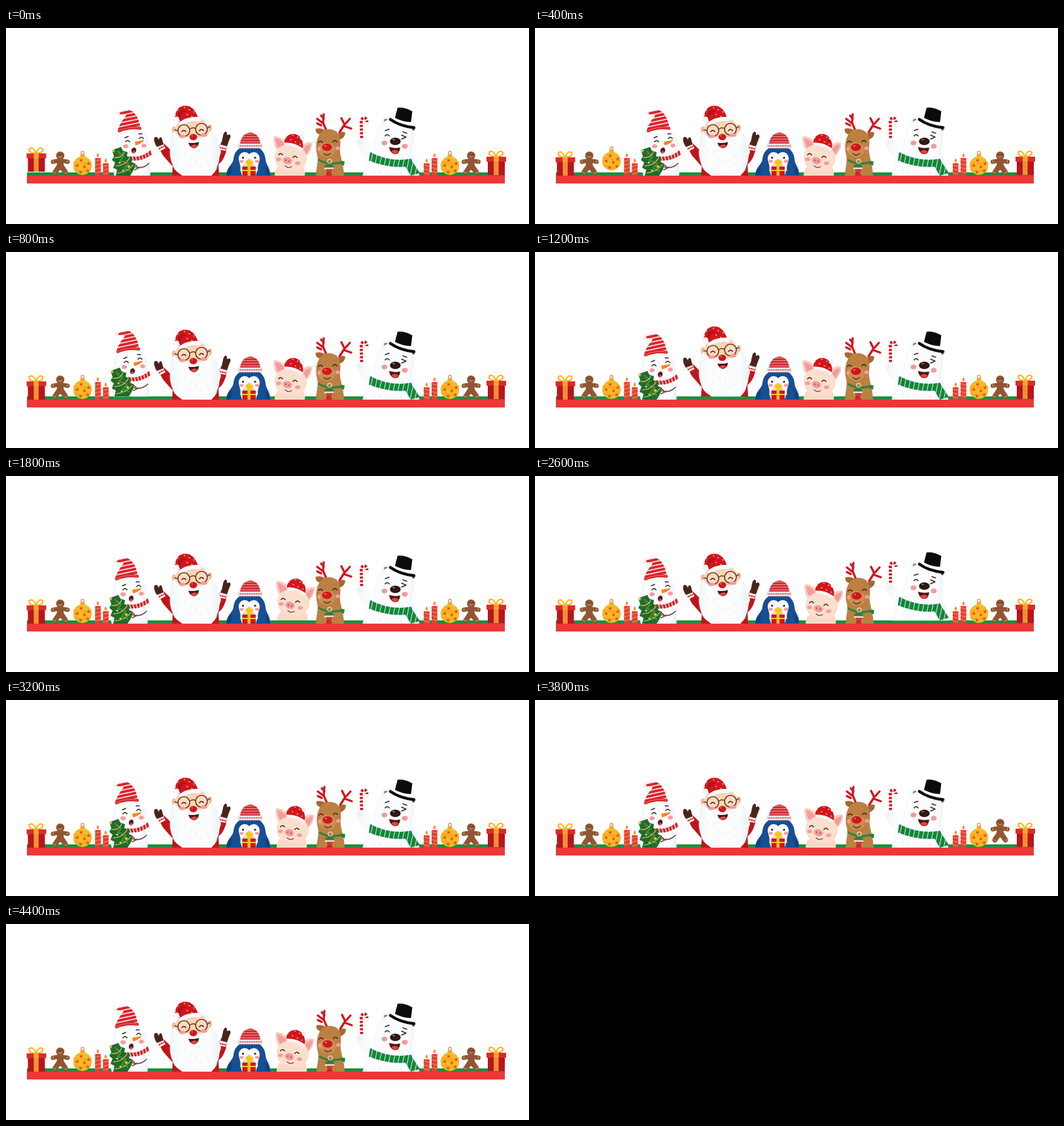
An HTML page that plays this animation: 800 by 300 pixels, repeating every 4600 ms.

```html
<!DOCTYPE html>
<html lang="en">
<head>
<meta charset="utf-8">
<title>Christmas friends</title>
<style>
html, body { margin: 0; width: 100%; height: 100%; overflow: hidden; background: #fff; }
svg { display: block; width: 100vw; height: 100vh; }
.hop { animation: hop 4.6s step-end infinite; animation-delay: calc(var(--at) * 1ms - 4600ms); }
.small { --dy: -7px; }
.big { --dy: -5px; }
@keyframes hop {
  0% { transform: translateY(var(--dy)); }
  4.34%, 100% { transform: none; }
}
/* These three come to rest a little away from where they began. */
.snowman { animation: snowman 4.6s step-end infinite; }
.pig { animation: pig 4.6s step-end infinite; }
.deer { animation: deer 4.6s step-end infinite; }
@keyframes snowman {
  0% { transform: none; }
  17.39% { transform: translate(-2px, -5px); }
  21.73%, 100% { transform: translate(-4px, 0); }
}
@keyframes pig {
  0% { transform: none; }
  39.13% { transform: translate(4px, -5px); }
  43.47%, 100% { transform: translate(3px, 0); }
}
@keyframes deer {
  0% { transform: none; }
  47.82% { transform: translate(1px, -5px); }
  52.17%, 100% { transform: translate(1px, 1px); }
}
.line { fill: none; stroke-linecap: round; stroke-linejoin: round; }
.ink { stroke: #3b2520; stroke-width: 1.4; }
.red { fill: #d3161c; }
.blush { fill: #f79a9c; }
.snow { fill: url(#snowShade); stroke: #e8eef2; stroke-width: .7; }
</style>
</head>
<body>
<svg viewBox="0 0 800 300" preserveAspectRatio="none">
<defs>
  <linearGradient id="snowShade">
    <stop offset="0" stop-color="#f1f6f9"/><stop offset=".2" stop-color="#fcfdfe"/>
    <stop offset=".8" stop-color="#fafcfd"/><stop offset="1" stop-color="#ecf2f6"/>
  </linearGradient>
  <pattern id="dots" width="8" height="8" patternUnits="userSpaceOnUse" patternTransform="rotate(25)">
    <rect width="8" height="8" fill="#d3161c"/><circle cx="3" cy="3" r=".9" fill="#fbe3e0"/>
  </pattern>
  <pattern id="hatStripes" width="6" height="5.6" patternUnits="userSpaceOnUse" patternTransform="rotate(-12)">
    <rect width="6" height="5.6" fill="#fff"/><rect width="6" height="4.1" fill="#d9242b"/>
  </pattern>
  <pattern id="scarfStripes" width="7" height="8" patternUnits="userSpaceOnUse" patternTransform="rotate(12)">
    <rect width="7" height="8" fill="#12853c"/><rect width="1.1" height="8" fill="#dcecd9"/>
  </pattern>
  <pattern id="redStripes" width="5" height="5" patternUnits="userSpaceOnUse" patternTransform="rotate(-15)">
    <rect width="5" height="5" fill="#d3232a"/><rect width="1.2" height="5" fill="#fff"/>
  </pattern>
  <pattern id="knit" width="3" height="4" patternUnits="userSpaceOnUse">
    <rect width="3" height="4" fill="#cf2a30"/>
    <path d="M0 3L1.5 1.5L3 3" fill="none" stroke="#f7dede" stroke-width=".7"/>
  </pattern>
  <path id="star" d="M0-3L.9-1L3-.9L1.4.5L1.9 2.7L0 1.5L-1.9 2.7L-1.4.5L-3-.9L-.9-1Z"/>
  <path id="smile" class="line" d="M-3.2 1.2Q0-2.6 3.2 1.2"/>

  <g id="gift">
    <path class="line" d="M14 9C8 9 3 6 5 2C8-2 13 3 15 9C17 3 21-2 25 2C27 6 22 9 15 9" stroke="#f7b81f" stroke-width="2.2"/>
    <rect x="2.5" y="14" width="26" height="23" fill="#b8151d"/>
    <rect x=".5" y="9" width="30" height="7.5" fill="#dc2a2c"/>
    <rect x="11.5" y="9" width="7.5" height="28" fill="#f28f35"/>
    <rect x="11.5" y="9" width="7.5" height="7.5" fill="#f9a52c"/>
  </g>

  <g id="ginger">
    <g class="line" stroke="#8f5733">
      <path d="M-11.2 15.5Q0 12.5 11.2 15.5" stroke-width="6.6"/>
      <path d="M-8 31.8L0 20L8 31.8" stroke-width="8"/>
      <path d="M0 14V23" stroke-width="10.5"/>
    </g>
    <circle cy="6" r="6.3" fill="#8f5733"/>
    <g class="line" stroke="#e0bd94" stroke-width=".8"><path d="M-2.6 7.4Q0 10 2.6 7.4M-11 13.5V17M11 13.5V17M-11 31L-7 33M11 31L7 33"/></g>
    <g fill="#4c2a16"><circle cx="-2.2" cy="4.5" r=".9"/><circle cx="2.2" cy="4.5" r=".9"/></g>
    <g fill="#d3332c"><circle cy="15" r="1"/><circle cy="20" r="1"/></g>
  </g>

  <g id="ball">
    <circle cy="2.6" r="2.4" fill="none" stroke="#e58a4a" stroke-width="1.2"/>
    <rect x="-3.5" y="5" width="7" height="4" rx="1" fill="#eea824"/>
    <circle cy="22.3" r="14.2" fill="#fbb724"/>
    <path class="line" d="M-13 17Q0 21 13 17M-12.5 28.5Q0 32.5 12.5 28.5" stroke="#ee9a25" stroke-width="1.2"/>
    <g fill="#e8502a">
      <use href="#star" x="-8" y="22"/><use href="#star" x="3" y="24"/><use href="#star" x="-2" y="14"/>
      <use href="#star" x="9.5" y="19"/><use href="#star" x="-3" y="32"/><use href="#star" x="8" y="30"/>
    </g>
  </g>

  <g id="candle">
    <path d="M4.5-6.5Q8.2-.8 4.5 0Q.8-.8 4.5-6.5Z" fill="#ee7a2a"/>
    <path d="M4.5-3.5Q6.3-.8 4.5-.4Q2.8-.8 4.5-3.5Z" fill="#ffc94f"/>
    <path d="M.3 1H9V28H.3Z" fill="#e5402f"/>
    <path d="M.3 6L9 3.5M.3 12L9 9.5M.3 18L9 15.5M.3 24L9 21.5" stroke="#f48f6d" stroke-width="1.1"/>
  </g>
  <g id="candles">
    <use href="#candle" x="0" y="198"/>
    <svg x="12" y="190" width="10" height="36"><use href="#candle" y="16"/></svg>
  </g>
</defs>

<rect width="800" height="300" fill="#fff"/>
<rect x="32" y="221" width="731" height="5.5" fill="#278940"/>

<g class="hop" style="--at:0;--dy:-6px"><use href="#gift" x="31" y="189"/></g>
<g class="hop" style="--at:200;--dy:-6px"><use href="#ginger" x="83" y="189.3"/></g>
<g class="hop small" style="--at:400"><use href="#ball" x="117" y="188.5"/></g>
<g class="hop small" style="--at:600"><use href="#candles" x="136"/></g>

<g class="snowman">
  <path class="snow" d="M166 226C162 211 165 199 174 193C165 184 166 163 177 155C190 147 212 153 217 169C220 179 217 187 211 193C219 202 222 214 220 226Z"/>
  <path d="M171 157C173 147 180 139 184 134C180 131 175 132 171 133C172 127 181 125 190 126C200 130 204 143 206 153Q188 150 171 157Z" fill="url(#hatStripes)"/>
  <circle cx="171.5" cy="130.5" r="2.6" fill="#fbf1f0" stroke="#ecd3d2" stroke-width=".5"/>
  <path class="line" d="M173 157.5Q188 151 205 153.5" stroke="#d9242b" stroke-width="4.4"/>
  <path class="line" d="M173 157Q188 150.5 205 153" stroke="#f5c2c2" stroke-width=".8" stroke-dasharray="1.5 2"/>
  <g class="line ink"><use href="#smile" x="186" y="173"/><use href="#smile" x="207" y="168"/>
    <path d="M182 168L187 166M203 162L208 162"/></g>
  <path d="M197 174L212 171.5Q205 179 198 179.5Z" fill="#f5842b"/>
  <ellipse class="blush" cx="183" cy="181" rx="4" ry="3"/><ellipse class="blush" cx="211" cy="180" rx="3.7" ry="3"/>
  <ellipse cx="195.5" cy="187.5" rx="3.6" ry="4.6" fill="#5f1c20" transform="rotate(15 195.5 187.5)"/>
  <path d="M193 190Q196 187 198 190Q195 193 193 190Z" fill="#ec6b68"/>
  <path d="M189 196Q206 200 221 187L224 193Q211 204 191 203Z" fill="url(#redStripes)"/>
  <path class="line" d="M219 207Q209 217 196 212" stroke="#67402c" stroke-width="1.5"/>
  <path d="M162 187L176 182L179 188L186 190L185 196L193 199L192 205L198 208L196 216L190 226H168L170 217L164 214L167 206L162 202L165 196Z" fill="#1f6b2e"/>
  <path d="M171 189L180 196L175 203L187 207L181 215L190 219" class="line" stroke="#3f9440" stroke-width="2.2"/>
  <path d="M165 198Q176 200 181 190M168 211Q182 211 189 199M171 222Q187 220 195 209" class="line" stroke="#f1cc45" stroke-width="1.2"/>
  <g fill="#f8ce39"><use href="#star" x="164" y="188"/><use href="#star" x="188" y="212"/><circle cx="174" cy="206" r="1.6"/><circle cx="179" cy="218" r="1.6"/></g>
  <g fill="#df3936"><circle cx="173" cy="193" r="1.4"/><circle cx="184" cy="204" r="1.4"/></g>
  <path class="line" d="M205 213L197 217M201 212L196 208" stroke="#67402c" stroke-width="1.5"/>
</g>

<g class="hop big" style="--at:1200">
  <path d="M254 226L255 212L240 195L232 180L242 177L260 195H317L328 177L338 181Q336 200 325 209L326 226Z" fill="#c3141b"/>
  <path d="M231 181L241 177L244 184L235 189ZM327 178L338 181L336 188L325 186Z" fill="#f6e5e0"/>
  <path class="line" d="M234 185L242 181M327 183L336 185" stroke="#c3141b" stroke-width="1.5" stroke-dasharray="2 1.5"/>
  <path d="M231 182C227 177 225 169 228 167C231 166 232 168 234 171C234 166 239 166 239 171L241 178ZM328 178C332 173 331 161 335 159C338 158 338 161 338 164C343 161 345 165 342 170L338 181Z" fill="#4a231b"/>
  <ellipse cx="257" cy="156" rx="3.5" ry="5.5" fill="#f5bd99"/><ellipse cx="311.5" cy="153" rx="3.5" ry="5.5" fill="#f5bd99"/>
  <path d="M260 167C256 143 268 137 284 137C302 135 313 147 311 168Z" fill="#fbd3b5"/>
  <path class="snow" d="M258 158C250 166 254 174 252 182C249 194 253 203 255 210C258 219 265 222 270 226H314C317 222 322 219 323 211C327 203 325 198 328 192C330 184 323 180 323 173C321 164 315 159 312 158C311 166 300 168 293 170Q286 167 279 170C270 170 261 166 258 158Z"/>
  <path class="line" d="M263 184l3 5m-3 8l4 4m5-12l3 5m-3 10l4 5m6-12l2 5m6 5l3-5m3 12l4-5m3-11l4-5m-2 17l5-6m-40 17l5 2m10 0l5-3" stroke="#e3eaef" stroke-width=".9"/>
  <path d="M258 138C259 127 264 119 274 119C285 118 293 130 294 140L266 146Q266 138 263 136Z" fill="url(#dots)"/>
  <path d="M263 133C266 125 272 124 276 128C270 127 268 134 266 142Z" fill="#b3131b"/>
  <circle cx="260.5" cy="140" r="4.2" fill="#fbf8f6" stroke="#e9e2df" stroke-width=".6"/>
  <path class="line" d="M268 146Q281 138 295 140" stroke="#eee8e5" stroke-width="6.6"/>
  <path class="line" d="M268 145.5Q281 137.5 295 139.5" stroke="#fff" stroke-width="5.5"/>
  <g fill="#fff" fill-opacity=".15" stroke="#6a3c22" stroke-width="1.6"><circle cx="272" cy="157" r="9"/><circle cx="299" cy="155" r="9"/></g>
  <path class="line" d="M281 155Q285 151 290 154M308 153L312 151M263 157L258 156" stroke="#6a3c22" stroke-width="1.5"/>
  <g class="line ink"><use href="#smile" x="272" y="157.5"/><use href="#smile" x="299" y="156"/></g>
  <ellipse class="blush" cx="270" cy="166" rx="5" ry="2.5"/><ellipse class="blush" cx="303" cy="164" rx="5" ry="2.5"/>
  <ellipse class="red" cx="286.5" cy="167" rx="5.8" ry="4.8"/><circle cx="284.5" cy="165" r="1.1" fill="#f6898a"/>
  <path d="M279 175.5Q287 177 295 174.5Q295 183 287 184Q281 183 279 175.5Z" fill="#561318"/>
  <path d="M282 181Q288 176 293 180Q288 186 282 181Z" fill="#ec403c"/>
</g>

<g class="hop big" style="--at:1600">
  <path d="M337 226C337 213 346 210 348 201C349 189 357 180 373 180C389 180 396 190 397 201C398 211 405 214 404 226Z" fill="#174f94"/>
  <path d="M338 226Q338 217 346 211Q344 219 346 226ZM403 226Q403 217 396 211Q399 219 396 226Z" fill="#113f7c"/>
  <path d="M372 193C365 186 355 192 356 201C357 208 361 211 357 226H387C383 211 387 209 388 201C389 192 379 186 372 193Z" fill="#f9fbfd"/>
  <path d="M358 179C358 167 366 160 375 160C384 161 389 169 389 179Z" fill="url(#knit)"/>
  <rect x="355" y="177" width="37" height="7" rx="3" fill="#f6ebeb" stroke="#d5a6a8" stroke-width=".6"/>
  <path class="line" d="M358 180.5H390" stroke="#d34c50" stroke-width="1.8" stroke-dasharray="1 2.5"/>
  <g fill="#302727"><circle cx="362.5" cy="198.5" r="1.6"/><circle cx="381" cy="198.5" r="1.6"/></g>
  <ellipse class="blush" cx="360.5" cy="204" rx="3" ry="2.3"/><ellipse class="blush" cx="384" cy="204" rx="3" ry="2.3"/>
  <path d="M366 205Q372 196 378 205Q376 211 372 211Q368 211 366 205Z" fill="#fbcb1f"/>
  <path class="line" d="M367 205Q372 208 377 205" stroke="#e5a52a" stroke-width=".8"/>
  <path class="line" d="M371 212Q362 207 364 212Q371 214 379 211Q380 207 371 212" stroke="#f4bd35" stroke-width="1.3"/>
  <rect class="red" x="361.5" y="212" width="20.5" height="14"/>
  <path d="M369.5 212H374V226H369.5ZM361.5 217H382V219H361.5Z" fill="#f9c430"/>
  <path d="M342 226Q346 215 359 219L361 226ZM401 226Q397 215 384 219L382 226Z" fill="#174f94"/>
</g>

<g class="pig">
  <path d="M411 226C411 217 415 211 424 209H450Q459 215 457 226Z" fill="#f8d8c6"/>
  <path d="M416 190C410 181 408 171 410 166C417 165 426 170 430 178ZM448 186C452 177 463 173 468 176C469 184 464 193 456 199Z" fill="#f8cbbc"/>
  <path d="M418 186Q412 177 412 168.500Q420 170 426 178ZM453 188Q458 178 466 178Q465 188 458 194Z" fill="#f49a9f"/>
  <path d="M411 198C411 184 422 178 435 178C451 179 461 189 460 202C458 214 449 220 434 219C420 218 411 210 411 198Z" fill="#fbdfcd"/>
  <path d="M426 176C425 168 432 162 440 162C450 163 456 173 454 184Q441 177 426 176Z" fill="url(#dots)"/>
  <path class="line" d="M428 177.500Q442 178 452 185.500" stroke="#faf3f0" stroke-width="4.4"/>
  <circle cx="452.500" cy="168" r="2.800" fill="#fbf3f0" stroke="#e9d4ce" stroke-width=".5"/>
  <g class="line ink"><use href="#smile" x="420" y="193"/><use href="#smile" x="442" y="197"/></g>
  <ellipse class="blush" cx="417" cy="201" rx="3.700" ry="2.700"/><ellipse class="blush" cx="446" cy="207" rx="4" ry="2.700"/>
  <ellipse cx="430.500" cy="203" rx="7.200" ry="5.300" fill="#f49a9c" transform="rotate(15 430.500 203)"/>
  <g fill="#b95f62"><ellipse cx="428" cy="202.500" rx="1.100" ry="1.700"/><ellipse cx="433" cy="204" rx="1.100" ry="1.700"/></g>
  <path class="line" d="M427 211Q432 215.500 437 212" stroke="#82403a" stroke-width="1.200"/>
</g>

<g class="deer">
  <path class="line" d="M490 157L485 145L486 132M485 146L476 139M476 146L482 149M486 139L482 134M510 160L517 149L526 139M517 150L528 154M518 148L513 138" stroke="#d3161c" stroke-width="3.3"/>
  <path d="M482 164Q472 161 474 154Q483 152 490 158ZM507 163Q513 157 519 160Q519 169 509 171Z" fill="#a56834"/>
  <path d="M474 226C475 211 478 205 476 194C472 181 475 156 493 155C509 154 513 168 511 182C509 192 517 209 517 226Z" fill="#bd7f42"/>
  <path d="M477 188C477 177 486 174 492 175C502 176 505 184 503 191C499 200 483 200 477 188Z" fill="#c98f54"/>
  <g class="line ink"><use href="#smile" x="481" y="174"/><use href="#smile" x="503" y="173"/></g>
  <ellipse class="red" cx="491" cy="182.5" rx="7.6" ry="5.8"/><circle cx="488.5" cy="180.5" r="1.2" fill="#f58785"/>
  <ellipse class="blush" cx="479" cy="185" rx="2.6" ry="3"/><ellipse class="blush" cx="507" cy="184" rx="3.2" ry="3"/>
  <path class="line" d="M486 192Q491 197 497 192" stroke="#5c2c20" stroke-width="1.3"/>
  <path class="line" d="M479 202Q494 211 515 205" stroke="#238347" stroke-width="3"/>
  <path d="M508 206L518 204L517 211Z" fill="#238347"/>
  <circle cx="495" cy="204" r="3.2" fill="none" stroke="#f2dec0" stroke-width="1.2"/>
  <path d="M486 214Q488 208 494 208Q500 208 502 214Z" fill="#2c8042"/>
  <path d="M486 213.500H502L500 217H488Z" fill="#f2dcc0"/>
  <path d="M489 216H500L498 220H491Z" fill="#d4393a"/><path d="M491 220H497L499 226H489Z" fill="#ca2831"/>
</g>

<g class="hop big" style="--at:2600">
  <g fill="none" stroke-width="4.6">
    <path id="cane" d="M544 174L543.500 144C543 136 552 135 552 144" stroke="#faf3f1"/>
    <path d="M544 174L543.500 144C543 136 552 135 552 144" stroke="#d3161c" stroke-dasharray="3.400 2.200"/>
  </g>
  <circle cx="581" cy="142" r="6" fill="#f1f6f9"/><circle cx="581" cy="142" r="3" fill="#8b8083"/>
  <circle cx="622" cy="154" r="5.500" fill="#f1f6f9"/><circle cx="622" cy="154" r="3" fill="#46343a"/>
  <path class="snow" d="M546 226C547 216 553 208 552 200C545 192 537 182 536 173C538 168 546 168 549 174L559 191C566 184 565 166 571 152C577 139 595 136 611 143C624 150 626 167 621 184C619 195 631 207 632 226Z"/>
  <path class="line" d="M540 173l2 4m2-4l2 4m16 39l3 4m5-2l2 4m31-3l2 4" stroke="#dbe5ec" stroke-width="1"/>
  <path d="M594 136L620 144L618 150L592 143Z" fill="#fff"/>
  <path class="line" d="M588 140Q602 150 624 152.500" stroke="#0c0a0b" stroke-width="4.600"/>
  <path d="M599 122Q610 121 621.500 127.500L619.500 144Q606 143.500 595 137.500Z" fill="#0c0a0b"/>
  <g class="line ink"><use href="#smile" x="583" y="164"/><path d="M605 164L612 167L605 170"/><path d="M580 157L586 155M607 159L613 161"/></g>
  <ellipse cx="595.500" cy="173.500" rx="8.200" ry="5.800" fill="#2b1a18"/><ellipse cx="593" cy="171" rx="2" ry=".9" fill="#857379"/>
  <ellipse class="blush" cx="579" cy="176" rx="4.400" ry="3.700"/><ellipse class="blush" cx="610" cy="181" rx="4.400" ry="3.700"/>
  <path d="M586 182Q594 185 603 183Q602 194 594 193Q587 191 586 182Z" fill="#4c1518"/>
  <path d="M589 189Q595 184 601 189Q595 196 589 189Z" fill="#ec403c"/>
  <path d="M557 190Q587 206 620 200L623 211Q590 217 555 203Z" fill="url(#scarfStripes)"/>
  <path d="M607 205L620 202L633 222L619 226Z" fill="url(#scarfStripes)"/>
</g>

<g class="hop small" style="--at:3000"><use href="#candles" transform="translate(660) scale(-1 1)"/></g>
<g class="hop small" style="--at:3400"><use href="#ball" x="679" y="188.5"/></g>
<g class="hop small" style="--at:3800"><use href="#ginger" x="711.5" y="189.3"/></g>
<g class="hop" style="--at:4200;--dy:-8px"><use href="#gift" x="734.5" y="188"/></g>

<rect x="32" y="226" width="731" height="12" fill="#e93937"/>
</svg>
</body>
</html>
```
